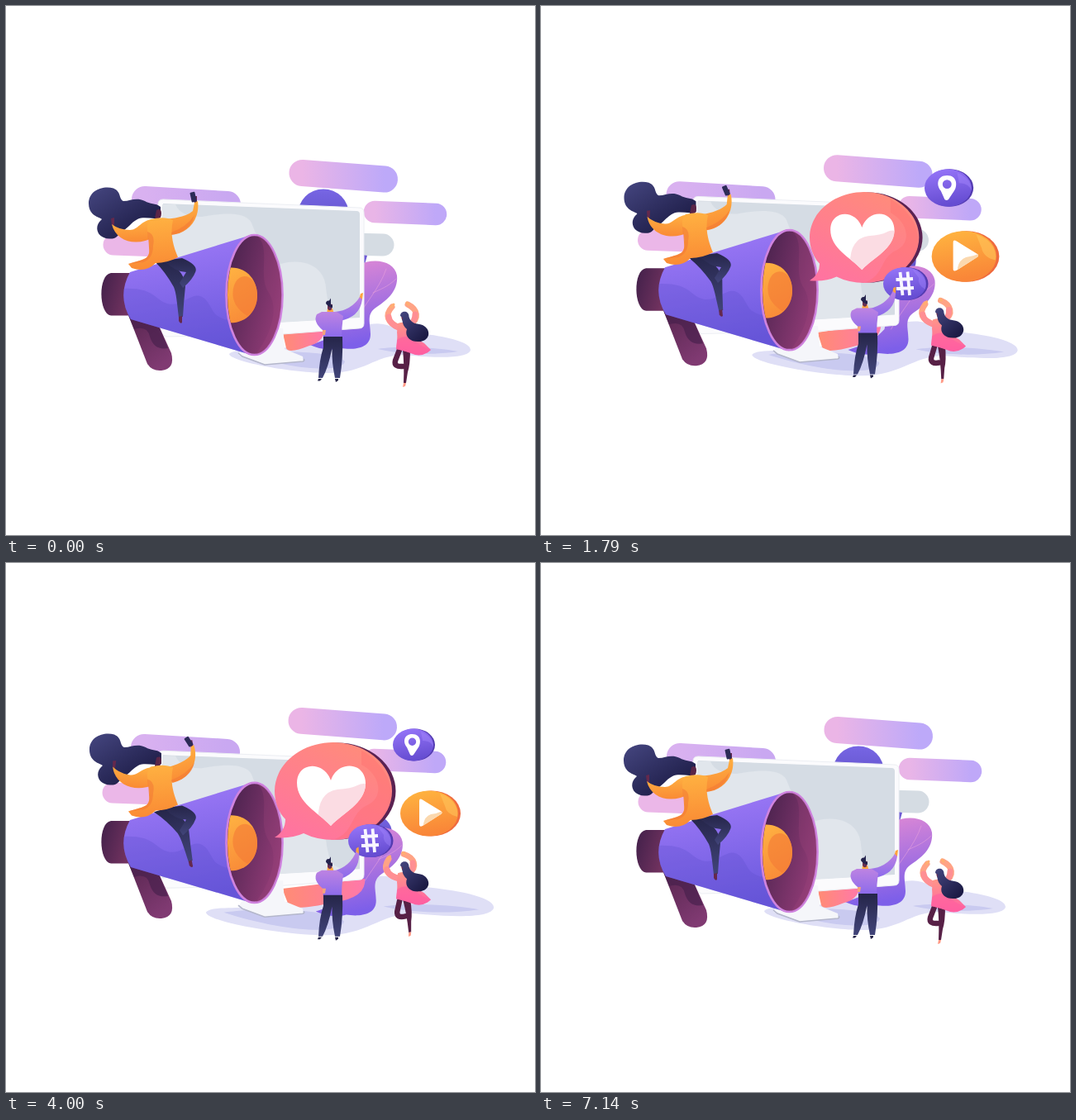
These frames come from a looping animation (640 px wide and 640 px high, 7210 ms). An HTML page:

```html
<!DOCTYPE html>
<html lang="en">
<head>
<meta charset="utf-8">
<title>Social campaign</title>
<style>
html, body { margin: 0; width: 100%; height: 100%; overflow: hidden; background: #fff; }
svg { display: block; width: 100%; height: 100%; }
.round { fill: none; stroke-linecap: round; stroke-linejoin: round; }
</style>
</head>
<body>
<svg viewBox="0 0 640 640">
<defs id="defs">
  <clipPath id="mouthClip"><ellipse cx="301" cy="349.500" rx="33" ry="72"/></clipPath>
  <clipPath id="coneClip"><path id="coneShape" d="M150 322L300 276V423L151 379Q134 351 150 322Z"/></clipPath>
  <clipPath id="heartClip"><path id="heartShape" d="M393 318C378 302 352 290 352 266C352 241 384 238 393 263C401 238 436 240 435 268C434 291 408 302 393 318Z"/></clipPath>
  <clipPath id="playClip"><path d="M500 288Q500 284 504 286.500L526 300Q529 302 526 304L504 318Q500 320 500 316Z"/></clipPath>
</defs>

<g id="shadow">
  <path fill="#dfdff6" d="M270 421C276 413 310 420 350 411C390 402 408 384 440 385C464 381 470 393 488 395C515 397 562 404 562 416C560 427 520 426 480 422C445 423 433 445 388 444C350 444 272 431 270 421Z"/>
  <path fill="#c9caf0" d="M288 421C320 416 400 417 410 430C408 444 350 441 288 421ZM450 415C475 411 520 413 547 418C515 423 475 421 450 415Z"/>
</g>

<g id="bars" class="round">
  <path stroke="url(#bar3)" stroke-width="32" d="M168 234L268 240"/>
  <path stroke="#ebb7e8" stroke-width="25" d="M130 289L185 291"/>
  <path stroke="url(#bar1)" stroke-width="32" d="M358.500 202L458 209.500"/>
  <path stroke="url(#bar2)" stroke-width="26.500" d="M446 249L520 252"/>
  <path stroke="#d5dce3" stroke-width="27" d="M415 288L456 289"/>
</g>

<circle id="dome" fill="url(#leafDark)"/>
<path fill="#6f5bd4" d="M431 301L437 302L433 316Z"/>
<g id="plant">
  <path fill="url(#leafPink)" d="M425 314C446 303 470 309 473 326C475 346 459 357 446 366C436 374 441 384 441 397C441 416 418 416 405 414C392 418 376 414 368 410C390 403 400 398 412 385Z"/>
  <path class="round" stroke="#f0a8dc" stroke-opacity=".5" d="M460 318C452 342 434 360 420 385M472 330C462 340 452 343 444 347"/>
</g>
<path id="coral" fill="url(#coralFill)" d="M335 396L386 385Q387 406 367 411Q342 421 339 414Z"/>

<g id="screen">
  <path fill="#fbfbfd" stroke="#eceef3" d="M190 234L427 244Q433 244 433 250V384Q433 390 427 390L335 397L194 400Q184 395 184 389V240Q184 234 190 234Z"/>
  <path fill="#d5dce4" d="M190 239L424 248Q428 248 428 252V377L320 383L189 388Z"/>
  <path fill="#e1e6ec" d="M189 240L205 240Q212 256 237 255C258 251 293 247 298 265Q303 282 318 290V383L189 388ZM332 312C362 304 385 316 387 340Q388 354 393 368Q399 377 415 378L330 383Z"/>
</g>

<g id="stand">
  <path fill="#f5f6fa" d="M300 390H335L337 415L359 424L360 430L313 434L281 422Z"/>
  <path fill="none" stroke="#b4b7cb" stroke-width="1.600" d="M281 420L286 424L313 434L359 430Q362 429 360 427"/>
</g>

<g id="horn">
  <path fill="url(#grip)" d="M148 374L184 385L200 420Q205 439 188 441Q177 442 171 433Z"/>
  <path fill="#45204c" opacity=".65" d="M148 374L184 385L196 414Q179 417 174 400Q171 386 155 391Z"/>
  <path fill="url(#back)" d="M127 323H152V374.500H127C112 373 111 325 127 323Z"/>
  <use href="#coneShape" fill="url(#cone)"/>
  <path clip-path="url(#coneClip)" fill="#5b4bc9" opacity=".28" d="M138 342C160 341 171 343 184 354C202 368 212 357 225 352C244 344 247 370 256 375C268 383 282 381 300 376V430H138Z"/>
  <ellipse cx="300.500" cy="349.500" rx="34" ry="72.500" fill="url(#mouth)" stroke="#cf83df" stroke-width="2.700"/>
  <g clip-path="url(#mouthClip)">
    <path fill="#a0437d" opacity=".25" d="M301 276C323 290 303 325 318 347C332 370 317 402 301 423H340V276Z"/>
    <path fill="url(#core)" d="M266 317C291 313 304 332 304 350C304 369 290 386 266 383Z"/>
    <path fill="#f47d36" opacity=".65" d="M304 350C304 324 282 320 276 338C270 357 282 369 292 375Q304 367 304 350Z"/>
  </g>
</g>

<g id="rider">
  <path id="hair" fill="url(#navy)" d="M100 239C100 223 117 217 130 220.500C140 225 136 233 142 236C151 236 157 231 168 236C174 240 181 238 187 243L187 256C178 259 168 254 159 258C151 262 147 270 139 273C134 281 130 282 125 281.500C110 281 106 267 115 259C120 256 100 257 100 239Z"/>
  <path fill="#5a2547" d="M182 247Q188 244 188 251Q188 257 184 257V262H179Z"/>
  <g id="shin">
    <path fill="url(#pants)" d="M180 309L199 307C207 319 217 325 217 339Q215 358 214 376L209 377C207 360 206 347 203 340Q193 322 180 309Z"/>
    <path fill="#64294d" d="M209 376L213 375L213 383Q211 385 209 381Z"/>
  </g>
  <path fill="url(#pants)" d="M191 308L213 305Q232 313 229.500 321Q226 331 214 341L210 335L218 322Q205 322 191 308Z"/>
  <g id="armL">
    <path fill="#64294d" d="M127 257L131 256L131 265L128 265Z"/>
    <path fill="url(#coat)" d="M128 264Q137 271 150 271C160 271 163 259 178 258L186 260L180 279C158 292 133 285 128 264Z"/>
  </g>
  <g id="armR">
    <path fill="#64294d" d="M227 230L231 230L231 238L228 239Z"/>
    <rect id="phone" x="223.500" y="225" width="6" height="12" rx="1" fill="#2c2b57"/>
    <path fill="url(#coat)" d="M192 258Q217 256 226 248L228 238L232 236C235 257 221 276 199 277Z"/>
  </g>
  <path fill="url(#coat)" d="M175 258Q192 254 202 259C198 277 203 292 208 304Q195 311 181 311Q169 323 152 317L148 312C167 306 175 307 173 292C175 279 166 267 175 258Z"/>
  <path fill="#f37835" opacity=".55" d="M171 273Q181 276 178 290Q178 306 166 310L148 312C167 306 175 307 173 292ZM200 274Q219 267 228 253Q223 273 200 277Z"/>
</g>

<g id="heart">
  <ellipse cx="401" cy="276" rx="70.500" ry="58.500" fill="#5a2252"/>
  <path fill="url(#red)" d="M325 332Q338 324 338 310C330 302 325 289 325 276C325 243.500 357 217 396 217C435 217 467 243.500 467 276C467 308.500 435 335 396 335Q376 335 360 327Q345 334 325 332Z"/>
  <path fill="#ff6769" opacity=".32" d="M430 227C452 238 470 263 465 289C456 318 430 333 398 334C422 325 416 303 437 293C459 283 452 255 430 244Z"/>
  <use href="#heartShape" fill="#fff"/>
  <path clip-path="url(#heartClip)" fill="#fbd4dc" opacity=".8" d="M378 320Q374 278 401 274Q418 273 425 269Q433 265 439 269V320Z"/>
</g>

<g id="pin">
  <ellipse cx="494" cy="220" rx="25" ry="19.500" fill="#533bb1"/>
  <ellipse cx="492.500" cy="220" rx="24.500" ry="19.500" fill="url(#violet)"/>
  <path fill="#a98bff" opacity=".4" d="M502 204Q518 211 517 223Q514 215 504 215Z"/>
  <path fill="#fff" fill-rule="evenodd" d="M491.500 207C503 207 502 219 499 223L493 232Q491 234 489 232L485 223C480 217 481 207 491.500 207ZM491.500 211.500A4.700 4.700 0 1 0 491.500 220.900A4.700 4.700 0 1 0 491.500 211.500Z"/>
</g>

<g id="play">
  <ellipse cx="514.500" cy="303" rx="35.500" ry="27.500" fill="#ef6a3e"/>
  <ellipse cx="512" cy="303" rx="35" ry="27.500" fill="url(#sun)"/>
  <path fill="#ffc65c" opacity=".55" d="M525 279C541 284 548 296 546 307Q533 304 531 294Z"/>
  <g clip-path="url(#playClip)">
    <path fill="#fff" d="M495 280H535V325H495Z"/>
    <path fill="#fbd8ae" d="M505 325Q503 308 514 304Q523 303 530 299V325Z"/>
  </g>
</g>

<g id="hash">
  <ellipse cx="442" cy="336" rx="26.500" ry="20" fill="#533bb1"/>
  <ellipse cx="440" cy="336" rx="26" ry="20" fill="url(#violet)"/>
  <path fill="#a98bff" opacity=".35" d="M449 318Q469 327 465 343Q455 337 457 329Z"/>
  <path fill="none" stroke="#f9f6ff" stroke-width="3.800" d="M434.500 322L437.500 350M443.500 321.500L446 350M429.500 331L450 330M430 342L451 341"/>
</g>

<g id="man">
  <path fill="#ffa83f" d="M389 366H395L397 373H388Z"/>
  <path fill="#693052" d="M389 360L395 361L394 367Q391 370 389 366Z"/>
  <path fill="#24234d" d="M387 360Q387 356 391 356.500L393 353.500L393 361L395 362L395 365Q391 365 387 360Z"/>
  <g id="manArm">
    <path fill="#ffa33e" d="M427 355L429 348L432 347L431 355Z"/>
    <path fill="url(#shirt)" d="M398 370Q418 368 428 352L431 355Q428 377 403 381Z"/>
  </g>
  <path fill="url(#shirt)" d="M382 370H400L408 375Q406 389 406 402H384L383 392Q371 382 376 373Z"/>
  <path fill="#f3a47b" d="M383 392H387L386 398H383Z"/>
  <path fill="url(#pants)" d="M384 400H407Q408 426 404 450H398Q394 431 394.500 414Q390 437 383 450H378Q379 428 384 413Z"/>
  <path fill="#252348" d="M378 451L382 451L380 453.500H377ZM398 451L402 451L402 453L399 455Z"/>
</g>

<g id="girl">
  <g id="girlLegs">
    <path class="round" stroke="#572046" stroke-width="6.500" d="M476 416L471 429Q469 437 480 436"/>
    <path fill="#572046" d="M480 416H489Q489 434 486 443L484 456H481Q482 434 480 416Z"/>
    <path fill="#ff9b87" d="M481 456H484L483 460L480 461Z"/>
  </g>
  <g id="girlArms">
    <path class="round" stroke="#ffa385" stroke-width="7" d="M476 389C461 383 458 374 467 364M488 385C501 379 498 367 486 361"/>
    <path class="round" stroke="#ff8f93" stroke-width="7" d="M477 390Q464 385 463 376M488 386Q495 382 495 373"/>
    <path class="round" stroke="#ffae70" stroke-width="3" d="M466 364L469 361M487 361L485 359"/>
  </g>
  <path fill="url(#dress)" d="M474 384Q485 380 493 389Q494 403 506 408L514 416Q506 424 495 422Q482 417 472 415Q474 402 473 395Z"/>
  <path fill="#ff60a0" opacity=".65" d="M473 404Q484 396 493 404Q502 412 514 416Q502 426 489 419L472 415Z"/>
  <path fill="#6a2b4d" d="M478 374H484L483 382Q479 384 478 374Z"/>
  <path fill="url(#navy)" d="M477 375C477 368 488 368 487.500 376C490 385 497 384 504 386C516 392 512 406 500 406C488 407 482 399 485 391Q478 385 480 377Z"/>
</g>
</svg>
<script>
const $ = id => document.getElementById(id);
const NS = "http://www.w3.org/2000/svg";

function gradient(id, from, to, x2 = 0, y2 = 1, x1 = 0, y1 = 0) {
  const g = document.createElementNS(NS, "linearGradient");
  Object.entries({ id, x1, y1, x2, y2 }).forEach(([k, v]) => g.setAttribute(k, v));
  [from, to].forEach((color, i) => {
    const stop = document.createElementNS(NS, "stop");
    stop.setAttribute("offset", i);
    stop.setAttribute("stop-color", color);
    g.append(stop);
  });
  $("defs").append(g);
}

gradient("bar1", "#ebb5e6", "#bda9f9", 1, 0);
gradient("bar2", "#e9b5e7", "#bfa8f8", 1, 0);
gradient("bar3", "#d9b1f0", "#c9a8f1", 1, 0);
gradient("leafDark", "#7766e4", "#5949bd");
gradient("leafPink", "#e48bd3", "#7d5fe9", .2, 1);
gradient("coralFill", "#ff8c74", "#ff78aa", 1, 0);
gradient("grip", "#582650", "#803a72", .6, 1);
gradient("back", "#41204a", "#71325f", 1, .4);
gradient("cone", "#a27cf9", "#6b59de", .2, 1);
gradient("mouth", "#43204a", "#8f3b75", 1, .55);
gradient("core", "#ffb342", "#f98d39", .3, 1);
gradient("navy", "#454680", "#1c1b45", .8, .9);
gradient("pants", "#252549", "#414479");
gradient("coat", "#ffb342", "#fa8c35", .1, 1);
gradient("red", "#ff72a2", "#ff8b7b", .65, 0, .1, 1);
gradient("violet", "#9877fa", "#664dd2", .2, 1);
gradient("sun", "#ffb640", "#f98638", .2, 1);
gradient("shirt", "#bd83e2", "#8a6aec");
gradient("dress", "#ff9688", "#ff5fa4");

const LOOP = 7210, CYCLE = 7140;

function keyed(t, keys) {
  if (t <= keys[0][0]) return keys[0][1];
  for (let i = 1; i < keys.length; i++) {
    const [a, from] = keys[i - 1], [b, to] = keys[i];
    if (t < b) {
      const u = (t - a) / (b - a);
      return from + (to - from) * u * u * (3 - 2 * u);
    }
  }
  return keys[keys.length - 1][1];
}

const pops = [
  ["heart", 325, 335, [[200, 0], [1000, .9], [1140, .91], [2500, .957], [3700, 1], [5100, 1], [6070, .575], [6700, 0]]],
  ["pin", 493, 220, [[250, 0], [1050, 1.28], [2700, 1], [6000, 1], [6350, 1.18], [6850, 0]]],
  ["play", 513.5, 303, [[250, 0], [1050, 1.28], [2400, 1], [5700, 1], [6300, 1.18], [6800, 0]]],
  ["hash", 441, 336, [[150, 0], [900, 1.12], [1800, 1], [5600, 1], [6200, 1.18], [6700, 0]]]
];
const domeKeys = [[0, 0], [1100, .5], [2500, 1], [4000, 1], [5000, .5], [6000, 0]];

const place = (id, value) => $(id).setAttribute("transform", value);
const move = (id, x, y) => place(id, `translate(${x} ${y})`);
const turn = (id, a, x, y) => place(id, `rotate(${a} ${x} ${y})`);
const zoom = (x, y, sx, sy = sx) => `translate(${x} ${y}) scale(${sx} ${sy}) translate(${-x} ${-y})`;

function draw(time) {
  const t = time % LOOP;
  const phase = 2 * Math.PI * Math.min(t, CYCLE) / CYCLE;
  const lift = (1 - Math.cos(phase)) / 2;

  place("shadow", `translate(0 ${lift}) ` + zoom(416, 417, 1 + .2 * lift));
  move("bars", -lift, -11.5 * lift);
  move("screen", 0, -7 * lift);
  move("stand", 0, -6 * lift);
  move("horn", 0, -11.5 * lift);
  move("plant", 7 * lift, 12 * lift);
  place("coral", zoom(336, 417, 1 + lift, 1 + .1 * lift));

  const fall = keyed(t, domeKeys), dome = $("dome");
  dome.setAttribute("cx", 384 + 62 * fall);
  dome.setAttribute("cy", 252.5 + 74 * fall);
  dome.setAttribute("r", 31 - 10 * fall);

  move("rider", 0, -12 * lift);
  turn("shin", -12 * lift, 198, 316);
  turn("armL", 8 * lift, 172, 270);
  turn("armR", -10 * lift, 203, 262);
  turn("phone", -12 - 12 * lift, 227, 231);
  move("hair", lift, -1.5 * lift);

  move("man", 0, -4.5 * Math.sin(phase));
  turn("manArm", -11 * lift, 402, 374);

  move("girl", 0, -9 * lift);
  turn("girlArms", -9 * lift, 483, 392);
  turn("girlLegs", -9 * lift, 482, 415);

  for (const [id, x, y, keys] of pops) {
    const s = keyed(t, keys);
    $(id).style.display = s > .001 ? "" : "none";
    place(id, zoom(x, y, s));
  }
}

const start = performance.now();
function tick() {
  draw(performance.now() - start);
  requestAnimationFrame(tick);
}
tick();
</script>
</body>
</html>
```
